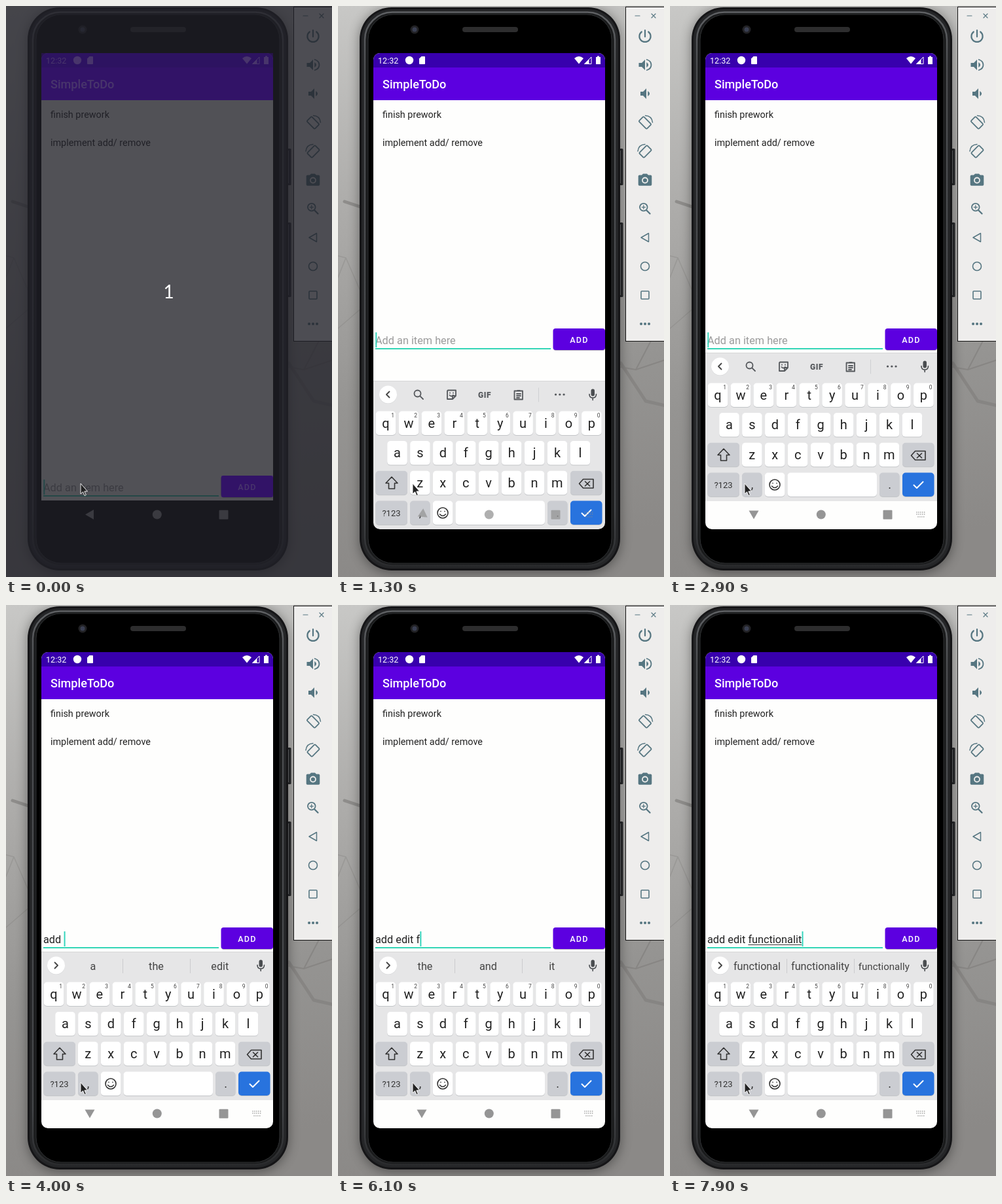
An HTML page that plays this animation: 498x873 px, repeating every 8 s.

```html
<!DOCTYPE html>
<html lang="en">
<head>
<meta charset="utf-8">
<title>To-do list on a phone</title>
<style>
html, body { margin: 0; width: 100%; height: 100%; overflow: hidden; background: #9a9896; }
svg { display: block; width: 498px; height: 873px; font-family: Roboto, sans-serif; }
text { white-space: pre; }
.mid { text-anchor: middle; }
.line { fill: none; stroke-linecap: round; stroke-linejoin: round; }
</style>
</head>
<body>
<svg id="stage" viewBox="0 0 498 873" xmlns="http://www.w3.org/2000/svg">
  <defs>
    <linearGradient id="wall" x1="0" y1="0" x2=".1" y2="1">
      <stop offset="0" stop-color="#c8c8c6"/><stop offset=".35" stop-color="#adacaa"/>
      <stop offset=".7" stop-color="#959492"/><stop offset="1" stop-color="#8b8987"/>
    </linearGradient>
    <linearGradient id="rim" x1="0" y1="0" x2="0" y2="1">
      <stop offset="0" stop-color="#5f6164"/><stop offset=".1" stop-color="#4c4e51"/>
      <stop offset=".9" stop-color="#434548"/><stop offset="1" stop-color="#2a2b2d"/>
    </linearGradient>
    <filter id="soft" x="-20%" y="-20%" width="140%" height="140%"><feGaussianBlur stdDeviation="9"/></filter>
    <clipPath id="screen"><rect x="54" y="72" width="354" height="728" rx="10"/></clipPath>
    <g id="turn">
      <rect x="-5.2" y="-8.5" width="10.4" height="17" rx="1.5" transform="translate(-.5 .5) rotate(-45)"/>
      <path d="M0 -10.5Q10 -10 11 0" stroke-width="1.5"/>
    </g>
  </defs>

  <rect width="498" height="873" fill="url(#wall)"/>
  <g class="line" stroke="#82807e" stroke-width="5" opacity=".7">
    <path d="M10 299L40 309"/>
    <path d="M432 546L470 604L500 611"/>
    <path d="M432 552L455 556L478 512M455 556L500 541" stroke-width="2"/>
    <path d="M0 382L12 385L36 440M12 385L0 415M0 493L36 462" stroke-width="1.5" opacity=".5"/>
  </g>

  <!-- phone body -->
  <rect x="33" y="4" width="398" height="862" rx="48" opacity=".4" filter="url(#soft)"/>
  <rect x="430" y="218" width="5.5" height="56" rx="1.5" fill="#202123"/>
  <rect x="430" y="331" width="5.5" height="114" rx="1.5" fill="#202123"/>
  <path d="M431.5 221v50M431.5 334v108" stroke="#56585a"/>
  <rect x="33" y="2" width="398" height="861" rx="49" fill="#151517"/>
  <rect x="36" y="5" width="392" height="855" rx="46" fill="#252628"/>
  <rect x="41" y="9.500" width="382" height="846" rx="42" fill="#1a1b1c" stroke="url(#rim)" stroke-width="2.5"/>
  <rect x="46" y="13" width="372" height="839" rx="38" stroke="#2f3133"/>
  <circle cx="117" cy="36" r="6.5" fill="#222225"/><circle cx="117" cy="36" r="3.5" fill="#3a3f52"/>
  <rect x="190" y="32" width="85" height="8" rx="4" fill="#2d2d2e"/>

  <!-- app -->
  <g clip-path="url(#screen)">
    <rect x="54" y="72" width="354" height="684" fill="#fefefd"/>
    <rect x="54" y="72" width="354" height="22" fill="#3800ad"/>
    <rect x="54" y="94" width="354" height="50" fill="#5c00e0"/>
    <g fill="#fff">
      <text x="61" y="87.5" font-size="12.6">12:32</text>
      <circle cx="109" cy="83" r="6.2"/>
      <path d="M127.5 77H132a1 1 0 0 1 1 1V88a1 1 0 0 1-1 1H125a1 1 0 0 1-1-1V80.5Z"/>
      <path d="M361 80Q368 74 375 80L368 88.5Z"/>
      <path d="M376.5 88.5L387 78V88.5Z" fill="none" stroke="#fff"/><path d="M376.5 88.5L383.5 81.5V88.5Z"/>
      <path d="M394 78H396V76.5H399V78H401V89H394Z"/>
      <text x="68" y="126" font-size="18.1" font-weight="500">SimpleToDo</text>
    </g>
    <g fill="#222" font-size="14.4">
      <text x="68" y="171">finish prework</text>
      <text x="68" y="214">implement add/ remove</text>
    </g>
    <g id="entry">
      <rect x="54" y="710" width="354" height="46" fill="#fefefd"/>
      <text id="typed" x="57" y="742" font-size="16.3"></text>
      <path id="under" stroke="#333"/>
      <path d="M57 749H325" stroke="#33d6b6" stroke-width="2"/>
      <rect id="caret" y="724" width="2" height="23" fill="#35d5bd"/>
      <rect x="329" y="720" width="79" height="32" rx="4" opacity=".25"/>
      <rect x="328.5" y="718" width="79.5" height="33" rx="4" fill="#5c00e0"/>
      <text x="354.3" y="739.5" font-size="12.6" font-weight="500" letter-spacing="1.12" fill="#fff">ADD</text>
    </g>
    <g id="board">
      <rect x="54" y="530" width="354" height="227" fill="#e6e6e7"/>
      <path d="M54 530.5H408" stroke="#d6d7d8"/>
      <rect x="54" y="757" width="354" height="43" fill="#fefefd"/>
      <circle cx="76.5" cy="551.5" r="13.5" fill="#cfd0d2"/><circle cx="76.5" cy="551" r="13.5" fill="#fff"/>
      <path id="chevron" class="line" stroke="#444" stroke-width="1.8"/>
      <g id="tools" class="line" stroke="#55585c" stroke-width="1.8">
        <circle cx="121.5" cy="549.5" r="5"/><path d="M125.3 553.3L130 558"/>
        <path d="M168 544.5H180V553L175 558H167V545.5ZM180 553H175V558"/>
        <path d="M170.5 552Q173 555 176 552M171 548.5v.2M176 548.5v.2"/>
        <path d="M269.5 545.5H282V558.5H269.5ZM273 550H279M273 553H279M273 556H277M274 545H278"/>
        <path d="M306.5 541V562" stroke="#cfd0d2" stroke-width="1"/>
        <path d="M332.5 551h.1M338.8 551h.1M345 551h.1" stroke-width="3.2"/>
        <text class="mid" x="224" y="555.5" font-size="12" font-weight="900" letter-spacing=".6" fill="#55585c" stroke="none">GIF</text>
      </g>
      <g id="words" class="mid" fill="#444">
        <path d="M178.5 541V563M281.5 541V563" stroke="#cbccce"/>
        <text x="133" y="557.5"></text><text x="229.5" y="557.5"></text><text x="326.8" y="557.5"></text>
      </g>
      <rect x="386.5" y="542.5" width="5.5" height="11" rx="2.75" fill="#4a4d50"/>
      <path class="line" d="M384 550.5Q384 556 389.2 556Q394.5 556 394.5 550.5M389.2 556V559.5" stroke="#4a4d50" stroke-width="1.6"/>
      <g id="keys"></g>
      <g class="line" stroke="#333" stroke-width="1.6">
        <path d="M82 677L91 686.5H86.5V695H77.5V686.5H73Z"/>
        <path d="M374.5 680.5H390V694H374.5L368.5 687.2ZM377.5 684L384.5 690.8M384.5 684L377.5 690.8"/>
        <circle cx="160" cy="732" r="8"/><path d="M155.5 734Q160 739 164.5 734M157 729.5v.2M163 729.5v.2"/>
        <path d="M372.5 732.5L377 737L386.5 727.5" stroke="#fff" stroke-width="2"/>
      </g>
      <text class="mid" x="81.5" y="737" font-size="13" fill="#333">?123</text>
      <text class="mid" x="125.5" y="738" font-size="18" fill="#333">,</text>
      <text class="mid" x="335.5" y="738" font-size="18" fill="#333">.</text>
    </g>
  </g>
  <g id="nav" fill="#959595">
    <path id="back" d="M-7 0L6 -7.5V7.5Z"/>
    <circle cx="230.8" cy="777.5" r="7"/><rect x="325.5" y="770.8" width="14" height="14" rx="1"/>
    <path id="ime" class="line" d="M377 774H391M377 777H391M379 781H389" stroke="#8a8a8a" stroke-width="1.5" stroke-dasharray=".1 2.8"/>
  </g>

  <!-- side panel -->
  <rect x="439.5" y="1.5" width="70" height="511" fill="#eeedec" stroke="#111"/>
  <g class="line" stroke="#567681" stroke-width="1.8">
    <path d="M454 15H461M479 12L485 18M485 12L479 18" stroke-width="1.2"/>
    <path d="M469 37V47M463.8 39.5A8.6 8.6 0 1 0 474.2 39.5" stroke-width="2.2"/>
    <g fill="#567681" stroke="none">
      <path d="M459.5 87H464L469 82V98L464 93H459.5Z"/>
      <path d="M462 131H466L471 126V142L466 137H462Z"/>
      <path d="M471.3 86Q477 90 471.3 94ZM473.3 130Q479 134 473.3 138Z"/>
      <path d="M466 256.5H472L474 258.5H477.5a1.8 1.8 0 0 1 1.8 1.8V273a1.8 1.8 0 0 1-1.8 1.8H460.5a1.8 1.8 0 0 1-1.8-1.8V260.3a1.8 1.8 0 0 1 1.8-1.8H464Z"/>
    </g>
    <path d="M471.8 82Q478.5 84 478.5 90T471.8 98"/>
    <use href="#turn" transform="translate(469.5 178)"/>
    <use href="#turn" transform="translate(469 222) scale(-1 1)"/>
    <circle cx="469" cy="266.5" r="4" stroke="#eeedec"/>
    <path d="M466.8 305V310.2M464.2 307.6H469.4" stroke-width="1.3"/>
    <circle cx="466.8" cy="307.6" r="5.8"/><path d="M471.5 312.5L476.5 317.5" stroke-width="2.3"/>
    <path d="M463 354L474.5 347.5V360.5Z" stroke-width="1.5"/>
    <circle cx="469" cy="398" r="6.5" stroke-width="1.6"/>
    <rect x="463" y="436" width="12" height="12" rx="1" stroke-width="1.6"/>
    <path d="M463 486h.1M469 486h.1M475 486h.1" stroke-width="4"/>
  </g>

  <g id="dim">
    <rect width="498" height="873" fill="#212128" opacity=".78"/>
    <path d="M54 72H408V144H54ZM329 718H408V751H329Z" fill="#3a0a8a" opacity=".4"/>
    <text class="mid" x="248.5" y="447" font-size="28" style="font-family:Lato,sans-serif" fill="#fff">1</text>
  </g>
  <path d="M114 730V746L117.6 742.8L120 748.6L122.3 747.6L119.9 742H124.5Z" fill="#222" stroke="#fff" stroke-width=".9"/>
</svg>
<script>
const $ = id => document.getElementById(id);
const NS = "http://www.w3.org/2000/svg";
const LOOP = 8000, LIFT = -225, LEFT = 57;

function add(parent, tag, attrs, content = "") {
  const el = document.createElementNS(NS, tag);
  set(el, attrs);
  el.textContent = content;
  parent.append(el);
}
function set(el, attrs) {
  for (const k in attrs) el.setAttribute(k, attrs[k]);
}
const show = (el, on) => { el.style.display = on ? "" : "none"; };

const GREY = "#cbcdd2";
function key(x, y, w, fill = "#fff") {
  const box = { x, y, width: w, height: 36.5, rx: 5 };
  add($("keys"), "rect", { ...box, y: y + 1, fill: "#c3c5c8" });
  add($("keys"), "rect", { ...box, fill });
}
["qwertyuiop", "asdfghjkl", "zxcvbnm"].forEach((row, r) => {
  const y = 576.5 + r * 45.6, start = [73, 90.5, 125.3][r];
  [...row].forEach((ch, i) => {
    const x = start + i * 34.93;
    key(x - 15.3, y, 30.6);
    add($("keys"), "text", { x, y: y + 25, "font-size": 20, class: "mid", fill: "#222" }, ch);
    if (!r) add($("keys"), "text", { x: x + 10.7, y: y + 9.5, "font-size": 8.5, class: "mid", fill: "#444" }, (i + 1) % 10);
  });
});
key(57.5, 667.7, 48.5, GREY); key(355, 667.7, 48.5, GREY);
key(57.5, 713.5, 48.5, GREY); key(110, 713.5, 30.6, GREY);
key(144.8, 713.5, 30.6); key(179.5, 713.5, 136.5);
key(320, 713.5, 30.6, GREY); key(355, 713.5, 48.5, "#2873de");

// time, entered text, start and end of the underlined part
const TYPING = [
  [0, "", 0, 0], [3300, "a", 0, 1], [3500, "ad", 0, 2], [3700, "add", 0, 3], [3900, "add ", 0, 0],
  [4100, "add e", 4, 4], [4400, "add e", 4, 5], [4600, "add ed", 4, 6], [4800, "add edit", 4, 7],
  [5000, "add edit", 4, 8], [5700, "add edit ", 4, 8], [5900, "add edit ", 0, 0],
  [6100, "add edit f", 9, 9], [6300, "add edit f", 9, 10], [6500, "add edit fu", 9, 11],
  [6700, "add edit func", 9, 12], [6800, "add edit funct", 9, 14], [7000, "add edit functio", 9, 15],
  [7100, "add edit function", 9, 17], [7400, "add edit functiona", 9, 18],
  [7500, "add edit functional", 9, 19], [7600, "add edit functionali", 9, 20],
  [7900, "add edit functionalit", 9, 21]
];
const HINTS = [
  [0, ""], [3300, "a am about"], [3900, "a the edit"], [4400, "e edit end"], [4800, "ed edit eds"],
  [5000, "edit editing edition"], [5900, "the and it"], [6300, "f for from"], [6500, "fu full fun"],
  [6700, "func function functions"], [6800, "funct function functional"],
  [7200, "function functions functional"], [7600, "functional functionally functionality"],
  [7900, "functional functionality functionally"]
];
const SLIDE = [[0, 270], [1200, 130], [1300, 43], [1400, 11], [1500, 0]];
const BLINK_OFF = [[300, 900], [1500, 1900], [2300, 2900]];
const at = (list, t) => list.filter(s => s[0] <= t).pop();

const typed = $("typed"), slots = [...$("words").querySelectorAll("text")];
let last = "";

function drawText(t) {
  const [, text, from, to] = at(TYPING, t);
  const hints = at(HINTS, t)[1];
  const state = [text, from, to, hints].join("|");
  if (last === state) return;
  last = state;

  typed.textContent = text || "Add an item here";
  set(typed, { fill: text ? "#222" : "#9b9b9b" });
  const edge = n => LEFT + (n ? typed.getSubStringLength(0, n) : 0);
  set($("caret"), { x: edge(text.length) + .3 });
  set($("under"), { d: to > from ? `M${edge(from)} 744.5H${edge(to)}` : "" });

  show($("tools"), !hints);
  show($("words"), hints);
  set($("chevron"), { d: hints ? "M74.5 546.5L79 551L74.5 555.5" : "M78.5 546.5L74 551L78.5 555.5" });
  if (hints) hints.split(" ").forEach((word, i) => {
    const slot = slots[i];
    slot.textContent = word;
    set(slot, { "font-size": 16.2 });
    const w = slot.getComputedTextLength();
    if (i === 2 && w > 78) set(slot, { "font-size": 16.2 * 78 / w });
  });
}

function draw(t) {
  const open = t >= 1200, off = at(SLIDE, t)[1];
  show($("dim"), t < 100);
  show($("board"), open);
  set($("board"), { transform: `translate(0 ${off})` });
  set($("entry"), { transform: `translate(0 ${open ? LIFT : 0})` });
  const turn = open ? -90 * Math.max(0, 1 - off / 60) : 0;
  set($("back"), { transform: `translate(128 777.5) rotate(${turn})` });
  set($("nav"), { opacity: open && off ? .75 : 1 });
  show($("ime"), open && off < 50);
  drawText(t);
  show($("caret"), !BLINK_OFF.some(([a, b]) => t >= a && t < b));
}

const begin = performance.now();
function tick() {
  draw((performance.now() - begin) % LOOP);
  requestAnimationFrame(tick);
}
tick();
</script>
</body>
</html>
```
